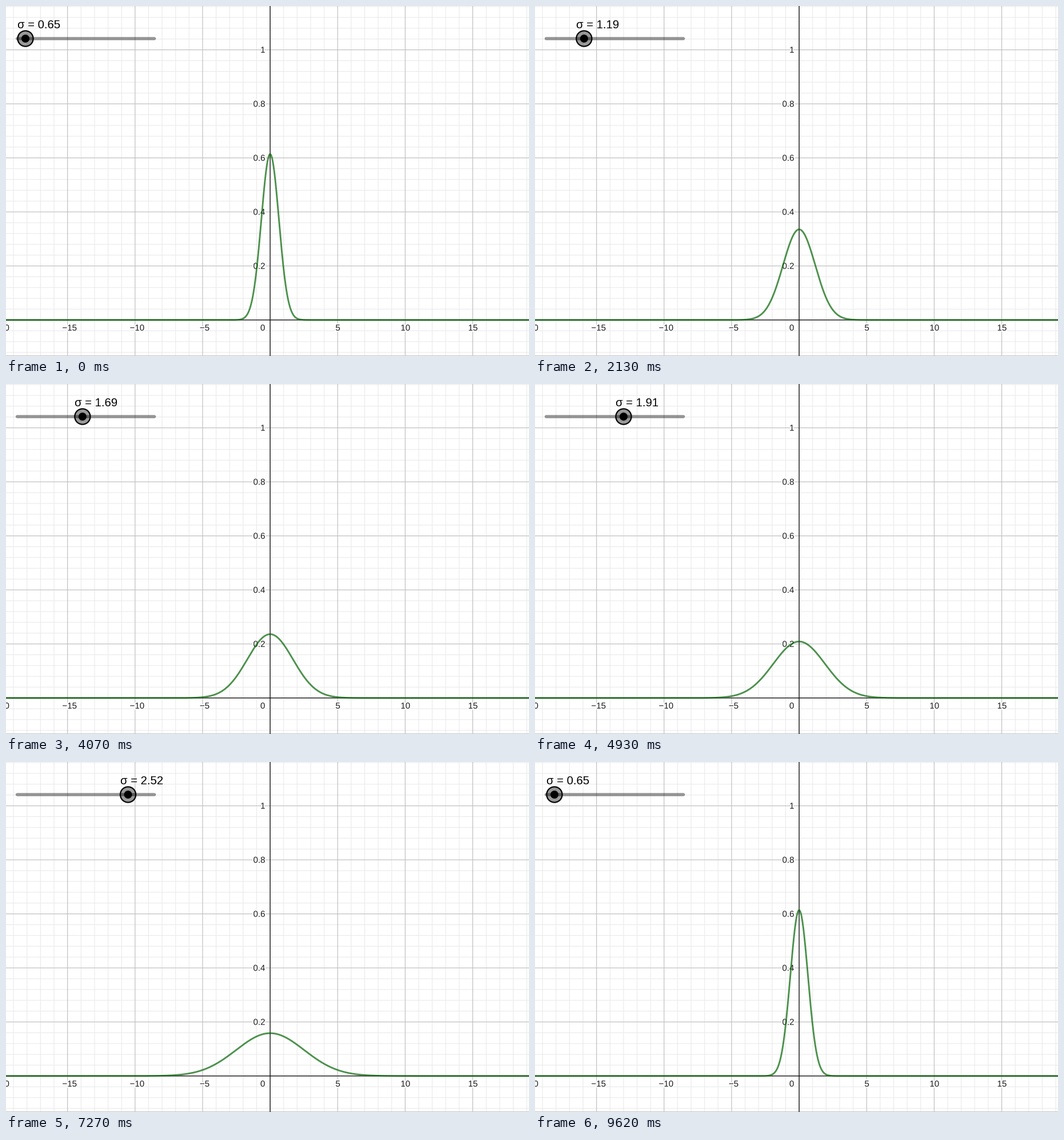
Write a matplotlib script that moves like this. It is 915x612 px and loops after 9.71 s.

```python
import numpy as np
import matplotlib.pyplot as plt
from matplotlib.animation import FuncAnimation
from matplotlib.patches import Circle
from matplotlib.patheffects import withStroke

W, H = 915, 612
LOOP_MS, FRAMES, FPS = 9710, 146, 15
X0, Y0 = 462.1, 549.0          # origin of the plot in pixels
UNIT_X, UNIT_Y = 23.63, 472.4  # pixels per unit
S_MIN, S_MAX = 0.5, 3.0        # slider range
TRACK_X, TRACK_Y, TRACK_UNIT = 19.6, 57, 96
SPEED = 0.2593                 # sigma per second
WRAP = 9.06                    # seconds until the slider jumps back
MAJOR, MINOR = "#bdbdbd", "#e9e9e9"

plt.rcParams["font.family"] = "Liberation Sans"

# At 72 dpi one point is one pixel, so sizes below are all in pixels.
fig = plt.figure(figsize=(W / 72, H / 72), dpi=72, facecolor="white")
ax = fig.add_axes([0, 0, 1, 1])
ax.set_xlim(0, W)
ax.set_ylim(H, 0)
ax.axis("off")


def px(x):
    return X0 + x * UNIT_X


def py(y):
    return Y0 - y * UNIT_Y


def knob_x(sigma):
    return TRACK_X + (sigma - S_MIN) * TRACK_UNIT


def vline(x, color, width, z):
    ax.vlines(x, 0, H, lw=width, color=color, zorder=z, snap=False)


def hline(y, color, width, z):
    ax.hlines(y, 0, W, lw=width, color=color, zorder=z, snap=False)


def draw_grid():
    for i in range(-20, 21):
        vline(px(i), *((MINOR, 1.05, 1) if i % 5 else (MAJOR, 1.15, 2)))
    for i in range(-3, 30):
        hline(py(i * 0.04), *((MINOR, 1.05, 1) if i % 5 else (MAJOR, 1.15, 2)))
    hline(H - 0.5, "#c4c4c4", 1, 2)


def axis_label(x, y, text, ha):
    ax.text(x, y, text, ha=ha, va="baseline", size=15.1, color="#1c1c1c",
            zorder=3, path_effects=[withStroke(linewidth=4, foreground="white")])


def draw_axes():
    for x in range(-20, 20, 5):
        if x < 0:
            axis_label(px(x) + 3.6, 567.6, f"\u2212{-x}", "center")
        elif x == 0:
            axis_label(449.2, 567.6, "0", "center")
        else:
            axis_label(px(x) + 0.4, 567.6, str(x), "center")
    for y in (0.2, 0.4, 0.6, 0.8, 1):
        axis_label(453.5, py(y) + 5.1, f"{y:g}", "right")
    vline(X0, "black", 1.2, 4)
    hline(Y0, "black", 1.2, 4)


draw_grid()
draw_axes()

xs = np.linspace(-2, W + 2, 1839)
curve, = ax.plot([], [], lw=2.9, color=(0, 100 / 255, 0), alpha=0.7, zorder=5,
                 solid_joinstyle="round", snap=False)

ax.plot([TRACK_X, knob_x(S_MAX)], [TRACK_Y, TRACK_Y], lw=5.6, color="black",
        alpha=0.4, solid_capstyle="round", zorder=6, snap=False)
knob = [
    Circle((0, TRACK_Y), 13.6, fc=(0, 0, 0, 0.4), ec="none", zorder=7),
    Circle((0, TRACK_Y), 13.6, fc="none", ec="black", lw=2.2, zorder=8),
    Circle((0, TRACK_Y), 7, fc="black", ec="none", zorder=9),
]
for part in knob:
    ax.add_patch(part)
caption = ax.text(0, 38.8, "", size=20.2, color="black", va="baseline", zorder=9)


def sigma_at(t):
    """Slider value in steps of 0.01: steady climb, then a jump to the start."""
    if t < 0.35:
        value = 0.65 + SPEED * t
    elif t < WRAP:
        value = 0.6355 + SPEED * t
    else:
        value = min(0.507 + SPEED * (t - WRAP), 0.65)
    return round(value, 2)


def update(i):
    sigma = sigma_at(i / FPS)
    u = (xs - X0) / UNIT_X
    density = np.exp(-0.5 * (u / sigma) ** 2) / (sigma * np.sqrt(2 * np.pi))
    curve.set_data(xs, py(density))
    x = knob_x(sigma)
    for part in knob:
        part.center = (x, TRACK_Y)
    caption.set_x(x - 14)
    caption.set_text(f"\u03c3 = {sigma:.2f}")
    return [curve, caption, *knob]


anim = FuncAnimation(fig, update, frames=FRAMES, interval=LOOP_MS / FRAMES,
                     repeat=True, blit=False)
plt.show()
```
